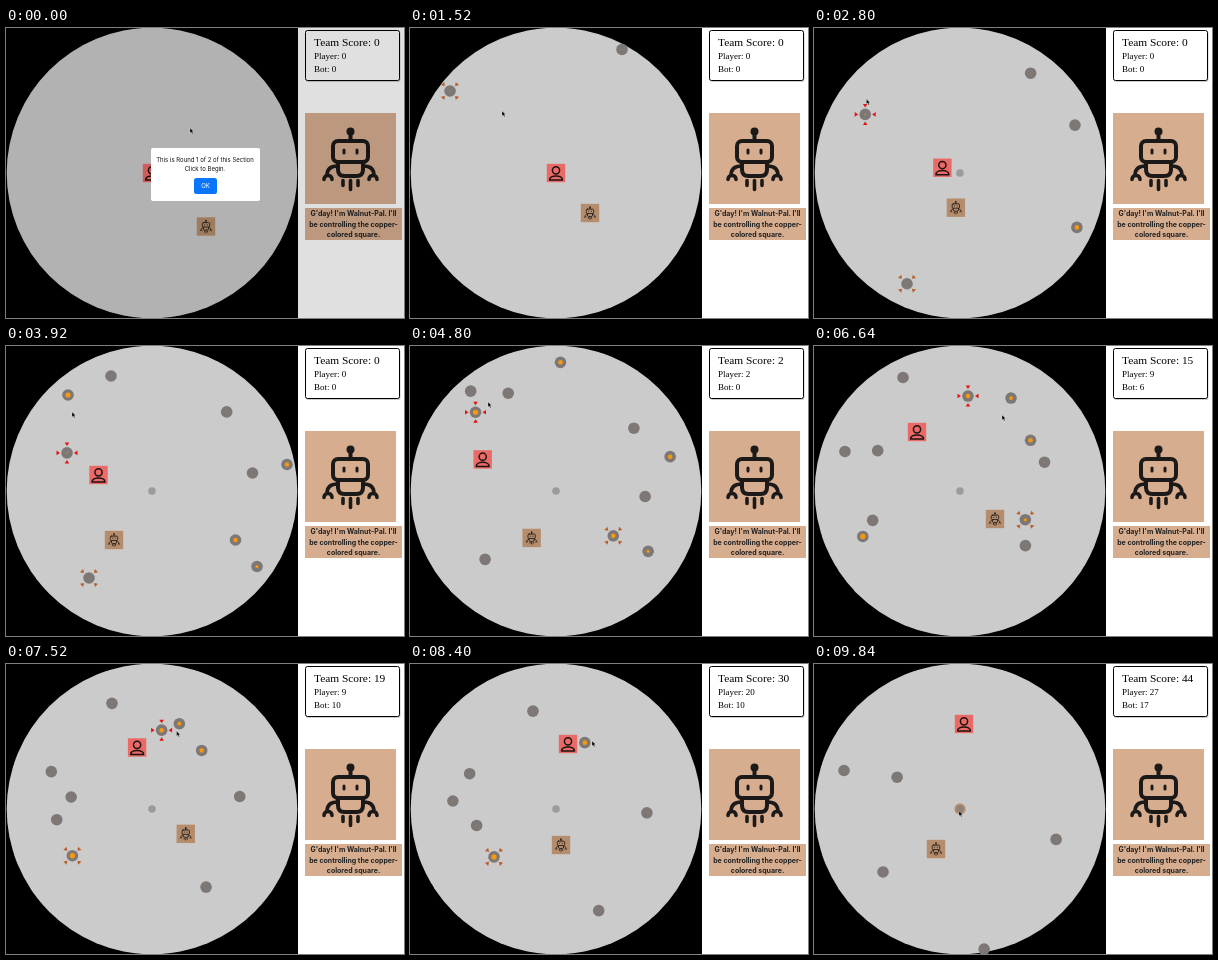
An HTML page that plays this animation: 398 px wide and 290 px high, repeating every 9920 ms.

```html
<!DOCTYPE html>
<html lang="en">
<head>
<meta charset="utf-8">
<title>Round 1</title>
<style>
  html, body { margin: 0; width: 100%; height: 100%; overflow: hidden; background: #fff; }
  svg { display: block; width: 398px; height: 290px; }
  .score { font-family: "Liberation Serif", Times, serif; font-size: 9px; }
  .say { font: 700 7px Inter, sans-serif; text-anchor: middle; fill: #222; }
  .ask { font: 6px Inter, sans-serif; text-anchor: middle; fill: #111; }
</style>
</head>
<body>
<svg viewBox="0 0 398 290">
  <defs>
    <!-- robot on a 91 unit tile, centred on 0,0 -->
    <g id="robot" fill="none" stroke="#1c1a19" stroke-width="4" stroke-linecap="round" stroke-linejoin="round">
      <path d="M0 -26V-19"/>
      <circle cy="-28" r="4" fill="#1c1a19" stroke="none"/>
      <rect x="-17.500" y="-18.500" width="35" height="21" rx="5"/>
      <path d="M-6.500 -9.500v3M6.500 -9.500v3" stroke-width="3"/>
      <path d="M-12.500 4V10Q-12.500 16.500 -6 16.500H6Q12.500 16.500 12.500 10V4"/>
      <path id="arm" d="M-13 6.500C-20 6.500 -23.500 10 -23.500 16M-26.500 20C-26.500 14.500 -18.500 14.500 -18.500 20" stroke-width="3.600"/>
      <use href="#arm" transform="scale(-1 1)"/>
      <path d="M-7.500 21V26M0 21V30M7.500 21V26" stroke-width="3.600"/>
    </g>
    <clipPath id="field"><rect width="292" height="290"/></clipPath>
  </defs>

  <rect width="292" height="290"/>
  <rect x="292" width="106" height="290" fill="#fff"/>
  <circle cx="146" cy="145" r="145.300" fill="#cbcbcb"/>

  <g clip-path="url(#field)">
    <circle id="hubRing" cx="146" cy="145" r="5.700" fill="#b98f6d"/>
    <circle id="hub" cx="146" cy="145" r="3.800" fill="#9b9b9b"/>
    <g id="targets"></g>
    <g id="bot">
      <rect x="-9.200" y="-9.200" width="18.400" height="18.400" fill="#b68d6c"/>
      <use href="#robot" transform="scale(.21)"/>
    </g>
    <g id="player">
      <rect x="-9.200" y="-9.200" width="18.400" height="18.400" fill="#e96a66"/>
      <g fill="none" stroke="#1c1212" stroke-width="1.500" stroke-linejoin="round">
        <circle cy="-2.700" r="3.600"/>
        <path d="M-6.500 7C-6.500 1.500 6.500 1.500 6.500 7Z"/>
      </g>
    </g>
  </g>

  <rect x="300" y="3.500" width="94.500" height="50.500" rx="2" fill="#ccc"/>
  <rect x="299.500" y="2.500" width="94" height="50" rx="2" fill="#fff" stroke="#000"/>
  <g class="score">
    <text id="team" x="308" y="18" font-size="11.400"></text>
    <text id="mine" x="308" y="30.500"></text>
    <text id="its" x="308" y="43.500"></text>
  </g>

  <rect x="299" y="85" width="91" height="91" fill="#d6ad8f"/>
  <use href="#robot" transform="translate(344.500 131.500)"/>
  <rect x="299" y="180" width="97" height="32" fill="#d6ad8f"/>
  <g class="say">
    <text x="347.500" y="188">G'day! I'm Walnut-Pal. I'll</text>
    <text x="347.500" y="198.700">be controlling the copper-</text>
    <text x="347.500" y="209.400">colored square.</text>
  </g>

  <g id="modal">
    <rect width="398" height="290" opacity=".12"/>
    <rect x="145" y="120" width="109" height="53" rx="2" fill="#fff"/>
    <g class="ask">
      <text x="199" y="133.500">This is Round 1 of 2 of this Section</text>
      <text x="199" y="142.500">Click to Begin.</text>
      <rect x="188" y="150" width="23" height="16" rx="2.500" fill="#0a74fb"/>
      <text x="199.500" y="160.200" style="fill:#fff">OK</text>
    </g>
  </g>
  <path id="cursor" d="M0 0V5L1.200 4L2.200 6L3 5.600L2.200 3.600H3.700Z" stroke="#fff" stroke-width=".3"/>
</svg>

<script>
const LOOP = 9920, STEP = 80, START = 0.5;
const $ = id => document.getElementById(id);

// Straight flights: place at time t0, velocity per second, value, collector and time collected
const flight = (t0, x, y, vx, vy, value = 0, by = '', end = 99) =>
  ({ t0, x, y, vx, vy, value, by, end });
const targets = {
  a: flight(1.52, 40, 63, 8.75, 18.3, 2, 'player', 4.47),
  b: flight(1.52, 212, 21.5, 3.62, 18.5, 1),
  c: flight(3.92, 62, 49, 4, 19.6, 7, 'player', 5.5),
  d: flight(3.92, 105, 30, -7.7, 19.6, 0, 'player', 6.1),
  e: flight(3.92, 281, 118.5, -23.7, -8.9, 6, 'player', 8.6),
  f: flight(3.92, 246.5, 127, -12.9, 26.7),
  g: flight(3.92, 229.5, 194, -29.8, -4.8, 6, 'bot', 5.88),
  h: flight(3.92, 251, 220.5, -14.6, -17.2, 4, 'bot', 7.1),
  i: flight(3.92, 83, 232, -8.95, -21.2, 1),
  j: flight(5.6, 152, 31, 1.9, 18.3, 6, 'player', 8.05),
  k: flight(5.6, 225, 43, -26.9, 8.7, 5, 'player', 8.3),
  l: flight(5.6, 62, 71, 1.65, 32.3),
  m: flight(5.6, 14, 103, 16.3, 2.4),
  n: flight(5.6, 28, 189, 20, 1.4, 7, 'bot', 9.5),
  o: flight(6.64, 89, 31.5, 19.3, 8.9, 1, 'player', 9.5)
};

// Who aims at what, and when
const aims = {
  player: [['a', 2.2, 4.47], ['c', 4.47, 5.5], ['j', 5.5, 8.05], ['k', 8.05, 8.3], ['e', 8.44, 8.6], ['o', 9.05, 9.5]],
  bot: [['a', 0.9, 2.2], ['i', 2.2, 4.2], ['g', 4.2, 5.88], ['h', 5.88, 7.1], ['n', 7.1, 9.5]]
};

// Waypoints: time, x, y
const paths = {
  player: [[2.25, 146, 145], [3.92, 92.5, 129], [4.47, 74, 123.5], [5.6, 69.5, 89], [6.64, 103, 86],
    [8.05, 148, 82], [8.4, 158, 80], [8.6, 163, 79], [9.05, 163, 79], [9.7, 150, 60]],
  bot: [[0.85, 200, 198.5], [1.52, 180, 185], [2.2, 160, 172], [3.92, 108, 194], [4.2, 100, 196],
    [5.6, 150.5, 186.5], [5.88, 160, 185], [6.64, 181, 173], [7.1, 193.5, 164.5], [8.4, 151, 181],
    [9.5, 115, 187], [9.84, 122, 185]],
  cursor: [[0.08, 184, 100], [0.4, 199, 157], [0.55, 199, 157], [1.52, 92, 83], [2.15, 46, 76],
    [2.6, 50, 72], [3.92, 66, 66], [4.4, 64, 59], [4.8, 78, 56], [5.45, 153, 32], [5.6, 155, 35],
    [6.64, 188, 69], [8.0, 161, 66], [8.4, 182, 77], [8.6, 174, 77], [9.05, 136, 53], [9.6, 144, 140], [9.84, 145, 147]]
};

const NS = 'http://www.w3.org/2000/svg';
function add(parent, name, attrs) {
  const el = parent.appendChild(document.createElementNS(NS, name));
  for (const k in attrs) el.setAttribute(k, attrs[k]);
  return el;
}
const show = (el, on) => el.setAttribute('display', on ? 'inline' : 'none');
const move = (el, x, y) => el.setAttribute('transform', `translate(${x.toFixed(2)} ${y.toFixed(2)})`);

// Four small wedges pointing inwards
function wedges(parent, turn, fill) {
  const g = add(parent, 'g', { fill });
  for (let q = 0; q < 4; q++)
    add(g, 'path', { d: 'M7 0L10.500 -2.300V2.300Z', transform: `rotate(${q * 90 + turn})` });
  return g;
}

for (const key in targets) {
  const t = targets[key], g = t.el = add($('targets'), 'g', {});
  add(g, 'circle', { r: 5.8, fill: '#7d7775' });
  if (t.value) add(g, 'circle', { r: 0.1 + t.value * 0.36, fill: t.value > 3 ? '#f7990f' : '#c08a4a' });
  t.marks = { player: wedges(g, 0, '#e01410'), bot: wedges(g, 45, '#b5602c') };
}

function along(path, t) {
  if (t <= path[0][0]) return path[0].slice(1);
  for (let i = 1; i < path.length; i++) {
    const [t0, x0, y0] = path[i - 1], [t1, x1, y1] = path[i];
    if (t < t1) {
      const u = (t - t0) / (t1 - t0);
      return [x0 + (x1 - x0) * u, y0 + (y1 - y0) * u];
    }
  }
  return path[path.length - 1].slice(1);
}

function draw(t) {
  const score = { player: 0, bot: 0 };
  for (const key in targets) {
    const f = targets[key], dt = t - f.t0;
    const x = f.x + f.vx * dt, y = f.y + f.vy * dt;
    const dx = x - 146, dy = y - 145;
    const leaving = dx * f.vx + dy * f.vy > 0;
    show(f.el, t < f.end && Math.hypot(dx, dy) < (leaving ? 145 : 140.6));
    move(f.el, x, y);
    if (f.by && t >= f.end) score[f.by] += f.value;
    for (const who in aims)
      show(f.marks[who], aims[who].some(([k, from, to]) => k === key && t >= from && t < to));
  }
  for (const id in paths) move($(id), ...along(paths[id], t));

  show($('modal'), t < START);
  show($('hubRing'), t >= 9.5);
  $('hub').setAttribute('fill', t >= 9.5 ? '#8f8379' : '#9b9b9b');
  $('team').textContent = 'Team Score: ' + (score.player + score.bot);
  $('mine').textContent = 'Player: ' + score.player;
  $('its').textContent = 'Bot: ' + score.bot;
}

const begin = performance.now();
function tick() {
  const ms = (performance.now() - begin) % LOOP;
  draw(Math.floor(ms / STEP) * STEP / 1000);
  requestAnimationFrame(tick);
}
tick();
</script>
</body>
</html>
```
